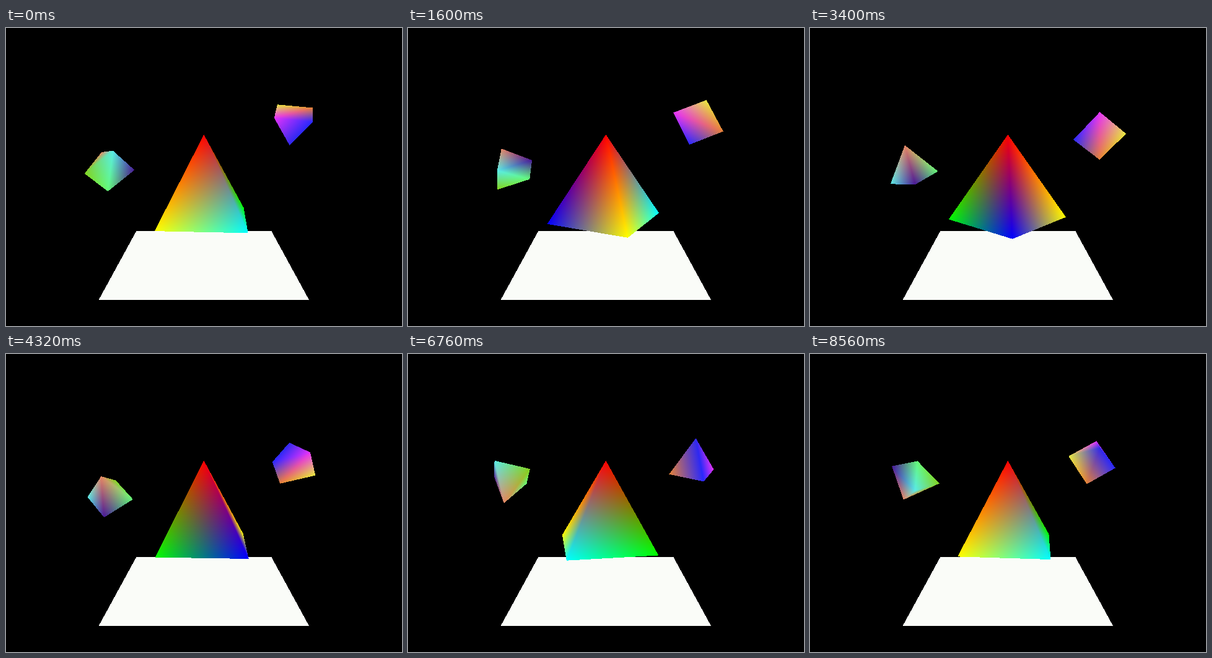
These frames come from a looping animation (639 px wide and 480 px high, 8.6 s). An HTML page with a canvas:

```html
<!DOCTYPE html>
<html lang="en">
<head>
<meta charset="utf-8">
<title>Tumbling pyramids</title>
<style>
  html, body { margin: 0; width: 100%; height: 100%; overflow: hidden; background: #000; }
  canvas { display: block; width: 639px; height: 480px; }
</style>
</head>
<body>
<canvas id="stage" width="639" height="480"></canvas>
<script>
const W = 639, H = 480;
const STEP = 40, STEPS = 215;
const FOCAL = 579.4, CX = 319.3, CY = 240.5;
const PITCH = 10.65;

const ctx = document.getElementById('stage').getContext('2d');
const image = ctx.createImageData(W, H);
const pixels = new Uint32Array(image.data.buffer);
const BLACK = 0xff000000;

// Apex first, then the base corners counter-clockwise from above.
const corners = [[0, 1, 0]];
const faces = [];
for (let i = 0; i < 4; i++) {
  const angle = (i - 0.5) * Math.PI / 2;
  corners.push([Math.SQRT2 * Math.sin(angle), -1, Math.SQRT2 * Math.cos(angle)]);
  faces.push([0, i + 1, (i + 1) % 4 + 1]);
}
faces.push([1, 4, 3], [1, 3, 2]);

// turn(n) gives the angles about x, y and z in degrees, applied z first.
const pyramids = [
  {
    x: CX, y: CY, depth: 8.46, size: 1,
    colors: ['#ff0000', '#ffff00', '#00ffff', '#00ff00', '#0000ff'],
    turn: n => [PITCH, -3.6 + n * 360 / STEPS, 0]
  },
  {
    x: 161, y: 215.3, depth: 10.45, size: 0.5,
    colors: ['#e68764', '#5aebe6', '#481896', '#64fa78', '#82d21e'],
    turn: n => [-86.4 + 1.32 * n, 51.5 - 0.943 * n, 45 - 0.38 * n]
  },
  {
    x: 461.1, y: 163.3, depth: 10.15, size: 0.5,
    colors: ['#3028eb', '#e633fa', '#e8ea40', '#e68237', '#2828ff'],
    turn: n => [212.8 + 1.035 * n, -75.5 + 1.333 * n, 0]
  }
];

const floor = { far: 326.6, near: 438, horizon: 128, spread: 0.5476, color: '#fafcf8' };

const rgb = hex => [1, 3, 5].map(i => parseInt(hex.slice(i, i + 2), 16));

function spin(a, b, degrees) {
  const r = degrees * Math.PI / 180, c = Math.cos(r), s = Math.sin(r);
  return [a * c - b * s, a * s + b * c];
}

function rotate([x, y, z], [rx, ry, rz]) {
  [x, y] = spin(x, y, rz);
  [z, x] = spin(z, x, ry);
  [y, z] = spin(y, z, rx);
  return [x, y, z];
}

const area = (a, b, c) =>
  (b[0] - a[0]) * (c[1] - a[1]) - (b[1] - a[1]) * (c[0] - a[0]);

// Fills a triangle, blending its corner colours.
function fillTriangle(pts, cols) {
  const [a, b, c] = pts;
  const total = area(a, b, c);
  if (Math.abs(total) < 1e-6) return;
  const span = (axis, limit) => {
    const values = pts.map(p => p[axis]);
    return [
      Math.max(0, Math.floor(Math.min(...values))),
      Math.min(limit - 1, Math.ceil(Math.max(...values)))
    ];
  };
  const [x0, x1] = span(0, W), [y0, y1] = span(1, H);
  for (let y = y0; y <= y1; y++) {
    for (let x = x0; x <= x1; x++) {
      const p = [x + 0.5, y + 0.5];
      const u = area(p, b, c) / total;
      const v = area(a, p, c) / total;
      const w = 1 - u - v;
      if (u < 0 || v < 0 || w < -1e-9) continue;
      const mix = i => Math.round(u * cols[0][i] + v * cols[1][i] + w * cols[2][i]);
      pixels[y * W + x] = BLACK | mix(2) << 16 | mix(1) << 8 | mix(0);
    }
  }
}

function drawFloor({ far, near, horizon, spread, color }) {
  const point = (y, side) => [CX + side * (y - horizon) * spread, y];
  const cols = Array(3).fill(rgb(color));
  fillTriangle([point(far, -1), point(far, 1), point(near, 1)], cols);
  fillTriangle([point(far, -1), point(near, 1), point(near, -1)], cols);
}

function drawPyramid({ x, y, depth, size, colors, turn }, n) {
  const angles = turn(n);
  const ox = (x - CX) * depth / FOCAL;
  const oy = (CY - y) * depth / FOCAL;
  const pts = corners.map(corner => {
    const [px, py, pz] = rotate(corner, angles);
    const k = FOCAL / (depth - pz * size);
    return [CX + (ox + px * size) * k, CY - (oy + py * size) * k];
  });
  const cols = colors.map(rgb);
  for (const face of faces) {
    const tri = face.map(i => pts[i]);
    if (area(...tri) < 0) fillTriangle(tri, face.map(i => cols[i]));
  }
}

// The floor never changes, so it is kept as the background.
pixels.fill(BLACK);
drawFloor(floor);
const background = pixels.slice();

let shown = -1;
function draw(n) {
  if (n === shown) return;
  shown = n;
  pixels.set(background);
  for (const pyramid of pyramids) drawPyramid(pyramid, n);
  ctx.putImageData(image, 0, 0);
}

const start = performance.now();
function tick() {
  draw(Math.floor((performance.now() - start) / STEP) % STEPS);
  requestAnimationFrame(tick);
}
tick();
</script>
</body>
</html>
```
